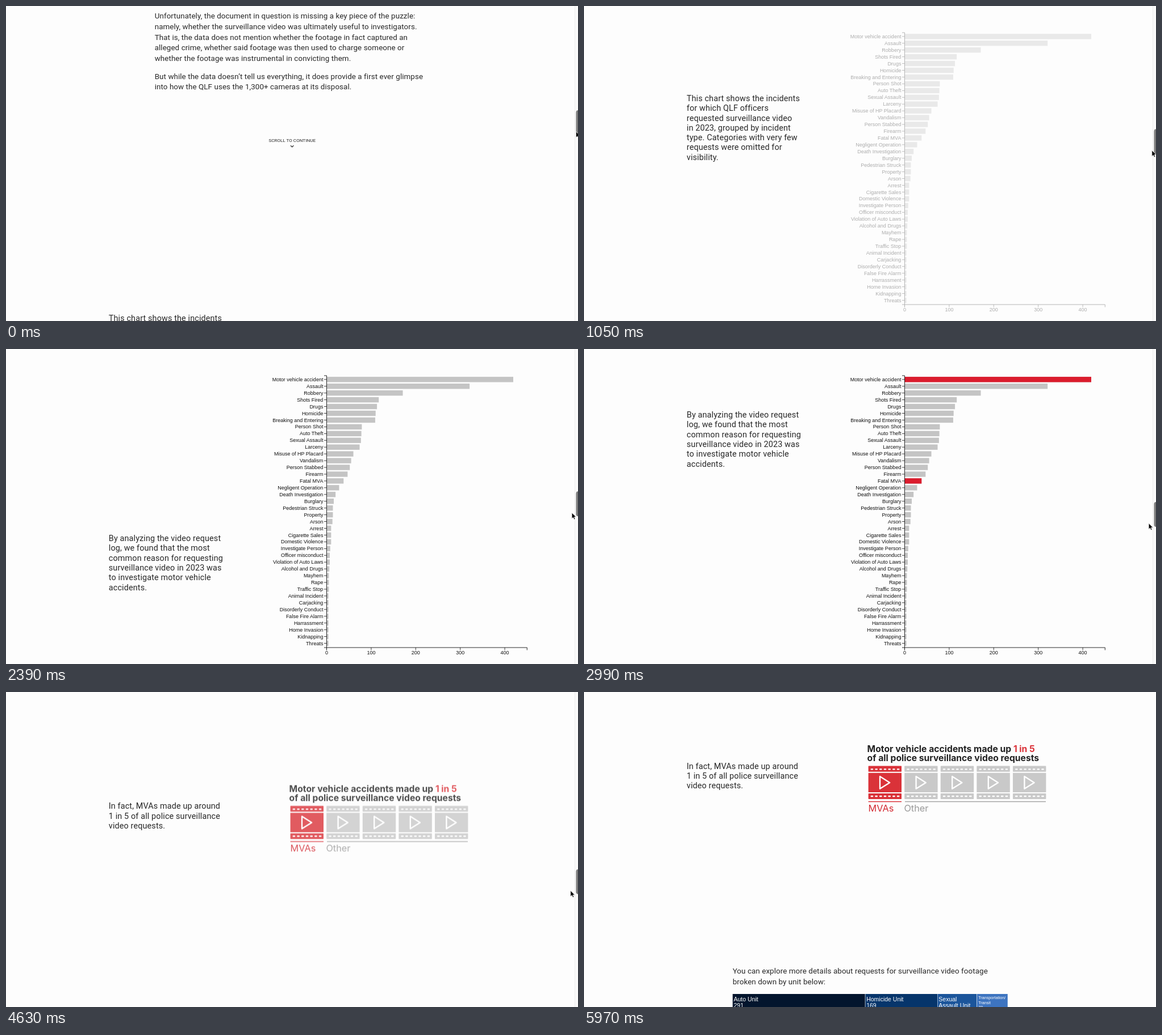
Write an HTML page that moves like this. It is 1007 px wide and 556 px high and loops after 6.12 s.

```html
<!DOCTYPE html>
<html lang="en">
<head>
<meta charset="utf-8">
<title>Surveillance video requests</title>
<style>
  html, body { margin: 0; width: 100%; height: 100%; overflow: hidden; background: #fdfdfd; }
  svg { display: block; width: 1007px; height: 556px; }
  text { white-space: pre; }
  .body { font: 13.4px Roboto, sans-serif; letter-spacing: .07px; fill: #282828; }
  .step { font: 14.4px Roboto, sans-serif; letter-spacing: .13px; fill: #282828; }
  .hint { font: 8.1px Roboto, sans-serif; fill: #282828; }
  .label { font: 9px "Liberation Sans", Arial, sans-serif; fill: #111; }
  .head { font: bold 15.7px Inter, sans-serif; fill: #222; }
  .key { font: 16.3px Inter, sans-serif; }
  .unit { font: 10.5px "Liberation Sans", Arial, sans-serif; fill: #fff; }
  .small { font: 7.2px "Liberation Sans", Arial, sans-serif; fill: #fff; }
</style>
</head>
<body>
<svg id="stage" viewBox="0 0 1007 556"></svg>
<script>
const stage = document.getElementById('stage');

function add(parent, tag, attrs = {}, content) {
  const el = document.createElementNS('http://www.w3.org/2000/svg', tag);
  for (const name in attrs) el.setAttribute(name, attrs[name]);
  if (content !== undefined) el.textContent = content;
  parent.appendChild(el);
  return el;
}
const rect = (parent, x, y, width, height, fill, rx = 0) =>
  add(parent, 'rect', { x, y, width, height, fill, rx });
const path = (parent, d, stroke, width, fill = 'none') =>
  add(parent, 'path', { d, stroke, fill, 'stroke-width': width });
const lines = (parent, cls, x, y, gap, list) =>
  list.forEach((s, i) => add(parent, 'text', { class: cls, x, y: y + i * gap }, s));

const chart = add(stage, 'g');
const page = add(stage, 'g');

// Scrolling copy
lines(page, 'body', 261.7, 22.2, 18.65, [
  'Unfortunately, the document in question is missing a key piece of the puzzle:',
  'namely, whether the surveillance video was ultimately useful to investigators.',
  'That is, the data does not mention whether the footage in fact captured an',
  'alleged crime, whether said footage was then used to charge someone or',
  'whether the footage was instrumental in convicting them.']);
lines(page, 'body', 261.7, 128.7, 18.65, [
  'But while the data doesn’t tell us everything, it does provide a first ever glimpse',
  'into how the QLF uses the 1,300+ cameras at its disposal.']);
add(page, 'text', { class: 'hint', x: 503.7, y: 240.2, 'text-anchor': 'middle' }, 'SCROLL TO CONTINUE');
path(page, 'M501 246.2l2.7 2.6 2.7-2.6', '#333', 1.2);

lines(page, 'step', 180.8, 556, 17.28, [
  'This chart shows the incidents', 'for which QLF officers',
  'requested surveillance video', 'in 2023, grouped by incident',
  'type. Categories with very few', 'requests were omitted for', 'visibility.']);
lines(page, 'step', 180.8, 1126.2, 17.28, [
  'By analyzing the video request', 'log, we found that the most',
  'common reason for requesting', 'surveillance video in 2023 was',
  'to investigate motor vehicle', 'accidents.']);
lines(page, 'step', 180.8, 1712.8, 17.28, [
  'In fact, MVAs made up around', '1 in 5 of all police surveillance', 'video requests.']);
lines(page, 'body', 261.7, 2074.4, 18.65, [
  'You can explore more details about requests for surveillance video footage',
  'broken down by unit below:']);

// Bar chart
const names = ('Motor vehicle accident,Assault,Robbery,Shots Fired,Drugs,Homicide,Breaking and Entering,' +
  'Person Shot,Auto Theft,Sexual Assault,Larceny,Misuse of HP Placard,Vandalism,Person Stabbed,Firearm,' +
  'Fatal MVA,Negligent Operation,Death Investigation,Burglary,Pedestrian Struck,Property,Arson,Arrest,' +
  'Cigarette Sales,Domestic Violence,Investigate Person,Officer misconduct,Violation of Auto Laws,' +
  'Alcohol and Drugs,Mayhem,Rape,Traffic Stop,Animal Incident,Carjacking,Disorderly Conduct,' +
  'False Fire Alarm,Harrassment,Home Invasion,Kidnapping,Threats').split(',');
const counts = [419, 321, 171, 117, 113, 110, 109, 79, 78, 77, 74, 60, 55, 52, 47, 38, 28, 20, 16,
  14, 14, 13, 10, 10, 10, 8, 7, 7, 6, 5, 5, 5];
const hot = [];
names.forEach((name, i) => {
  const y = 53.8 + i * 11.94, w = (counts[i] || 4) * .784;
  rect(chart, 564.5, y - 4.7, w, 9.4, '#c4c4c4');
  if (/^Motor|MVA/.test(name)) hot.push(rect(chart, 564.5, y - 4.7, w, 9.4, '#db1c2d'));
  path(chart, `M560 ${y}h4.5`, '#111', .8);
  add(chart, 'text', { class: 'label', x: 558.4, y: y + 3.1, 'text-anchor': 'end' }, name);
});
path(chart, 'M560 47h4.5V527h-4.5M564.5 531.5V527H917.3v4.5', '#111', .9);
for (let n = 0; n <= 400; n += 100) {
  const x = 564.5 + n * .784;
  path(chart, `M${x} 527v4.5`, '#111', .8);
  add(chart, 'text', { class: 'label', x, y: 539.4, 'text-anchor': 'middle' }, n);
}

// Film strip graphic
const film = add(page, 'g', { transform: 'translate(0 1577)' });
const red = '#da3239', grey = '#c9c9c9';
const title = add(film, 'text', { class: 'head', x: 498.6, y: 105.9 }, 'Motor vehicle accidents made up ');
add(title, 'tspan', { fill: red }, '1 in 5');
add(film, 'text', { class: 'head', x: 498.6, y: 121.6 }, 'of all police surveillance video requests');
for (let i = 0; i < 5; i++) {
  const cell = add(film, 'g', { transform: `translate(${500.6 + i * 63.6} 0)` });
  const fill = i ? grey : red;
  rect(cell, 0, 130.6, 58.4, 10.2, fill, .8);
  rect(cell, 0, 142.8, 58.4, 34.2, fill);
  rect(cell, 0, 179, 58.4, 10, fill, .8);
  for (let k = 0; k < 7; k++) {
    rect(cell, 4 + k * 7.7, 135.2, 4.6, 2.4, '#fff', 1);
    rect(cell, 4 + k * 7.7, 182.8, 4.6, 2.4, '#fff', 1);
  }
  path(cell, 'M20.4 149v21.8L37.6 159.9z', '#fff', 2.4).setAttribute('stroke-linejoin', 'round');
}
path(film, 'M500.6 193.4h58.4', red, 1.5);
path(film, 'M565 193.4h248', '#a5a5a5', 1.5);
add(film, 'text', { class: 'key', x: 500.6, y: 211, fill: '#d32b33' }, 'MVAs');
add(film, 'text', { class: 'key', x: 563.4, y: 211, fill: '#999' }, 'Other');

// Unit treemap
const tree = add(page, 'g', { transform: 'translate(0 2110)' });
[[261.7, 233, '#03152d', ['Auto Unit', '291']],
 [495.4, 126.6, '#06356b', ['Homicide Unit', '169']],
 [622.5, 68.7, '#1b559b', ['Sexual', 'Assault Unit']],
 [691.8, 54, '#3d74c0', ['Transportation/', 'Transit', '78']]].forEach(([x, w, fill, list], i) => {
  rect(tree, x, 0, w, 90, fill);
  if (i < 3) lines(tree, 'unit', x + 1.8, 12.8, 11.6, list);
  else lines(tree, 'small', x + 2.4, 9.4, 8.1, list);
});

// Scrollbar and pointer
const bar = add(stage, 'g');
rect(bar, 1001.5, 0, 6, 556, '#fafafa');
path(bar, 'M1001.5 0V556', '#ececec', 1);
const thumb = rect(bar, 1003.5, 0, 8, 44, '#7d7d7d', 4);
const pointer = path(stage, 'M0 0V10.6L2.5 8.4 4.1 12.1 6 11.3 4.4 7.7H7.7z', '#fff', .8, '#000');

// Scroll position held from each time on
const scroll = [
  [0, 0], [150, 45], [300, 105], [450, 165], [600, 220], [750, 277], [900, 335], [1050, 388],
  [1200, 432], [1350, 462], [1650, 486], [1800, 555], [1950, 635], [2100, 715], [2250, 787],
  [2400, 850], [2540, 905], [2690, 950], [2840, 982], [2990, 1005], [3140, 1042], [3290, 1075],
  [3590, 1101], [3740, 1218], [3890, 1275], [4040, 1320], [4190, 1366], [4340, 1413],
  [4490, 1461], [4630, 1506.5], [4780, 1552], [4930, 1577]];
const leave = [[5380, 987, 374], [5530, 973, 415], [5680, 955, 475], [5830, 948, 538]];
const LOOP = 6120, END = 5970;

const held = (list, t) => list.filter(row => row[0] <= t).pop();
const ramp = (t, a, b) => Math.min(1, Math.max(0, (t - a) / (b - a)));

function draw(t) {
  const [at, top] = held(scroll, t);
  const away = held(leave, t);
  const thumbY = 184 + top / 11.69;
  const [x, y] = away ? away.slice(1) : [Math.max(993.8, 1003.4 - top / 108), thumbY + 37.6];

  page.setAttribute('transform', `translate(0 ${-top})`);
  chart.setAttribute('opacity', ramp(at, 900, 1350) * (1 - ramp(at, 3590, 4040)));
  hot.forEach(el => el.setAttribute('opacity', ramp(at, 2250, 2690)));
  film.setAttribute('opacity', ramp(at, 4190, 4740));

  thumb.setAttribute('y', thumbY);
  thumb.setAttribute('fill', away ? '#c1c1c1' : '#7d7d7d');
  pointer.setAttribute('transform', `translate(${x} ${y})`);
  const shown = t < END ? 'visible' : 'hidden';
  bar.setAttribute('visibility', shown);
  pointer.setAttribute('visibility', shown);
}

const start = performance.now();
function tick() {
  draw((performance.now() - start) % LOOP);
  requestAnimationFrame(tick);
}
draw(0);
requestAnimationFrame(tick);
</script>
</body>
</html>
```
